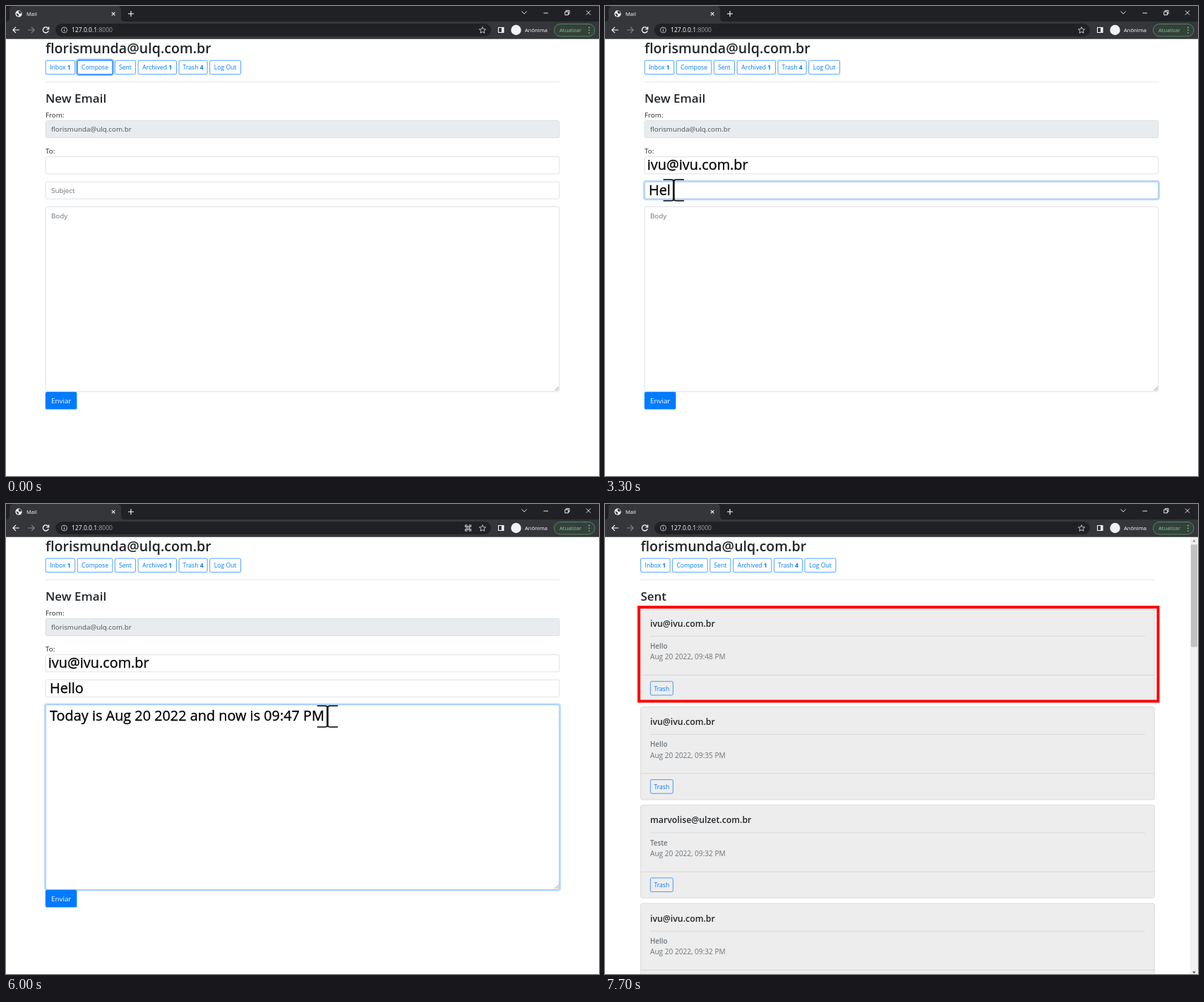
Animation of 840 by 666 pixels, one loop 8000 ms. Source, as an HTML page:

```html
<!DOCTYPE html>
<html lang="pt-BR">
<head>
<meta charset="utf-8">
<title>Mail</title>
<style>
html, body { margin: 0; width: 100%; height: 100%; overflow: hidden; background: #fff; }
svg { display: block; width: 840px; height: 666px; }
text { font-family: "Open Sans", "Noto Sans", sans-serif; white-space: pre; }
.h2 { font-size: 19.6px; font-weight: 600; fill: #212529; }
.h3 { font-size: 17px; font-weight: 600; fill: #212529; }
.h5 { font-size: 12.3px; font-weight: 600; fill: #212529; }
.label { font-size: 9.8px; fill: #212529; }
.value { font-size: 9.8px; fill: #495057; }
.hint { font-size: 9.8px; fill: #6c757d; }
.date { font-size: 10.1px; fill: #6c757d; }
.bold { font-weight: 600; }
.btn { font-size: 8.6px; fill: #007bff; text-anchor: middle; }
.btn tspan { font-weight: 700; }
.bar { font-size: 7.6px; fill: #fff; }
.hand { font-size: 19.85px; fill: #000; stroke: #000; stroke-width: .3px; }
.ico { fill: none; stroke: #fff; stroke-width: 1.1px; }
</style>
</head>
<body>
<svg id="stage" viewBox="0 0 840 666" xmlns="http://www.w3.org/2000/svg"></svg>
<script>
const LOOP = 8000;
const USER = 'florismunda@ulq.com.br';
const FRIEND = 'ivu@ivu.com.br';
const OTHER = 'marvolise@ulzet.com.br';
const BODY = 'Today is Aug 20 2022 and now is 09:47 PM';
const LEFT = 55.8, WIDTH = 728.4, LINE = .7;

const text = (x, y, cls, s, extra = '') => `<text x="${x}" y="${y}" class="${cls}" ${extra}>${s}</text>`;
const rect = (x, y, w, h, fill, extra = '') =>
  `<rect x="${x}" y="${y}" width="${w}" height="${h}" fill="${fill}" ${extra}/>`;
const path = (d, extra = 'class="ico"') => `<path d="${d}" ${extra}/>`;
const circle = (x, y, r, extra) => `<circle cx="${x}" cy="${y}" r="${r}" ${extra}/>`;

// a rounded box whose border lies inside the given size
const frame = (x, y, w, h, fill, stroke, r = 2.4) =>
  rect(x + LINE / 2, y + LINE / 2, w - LINE, h - LINE, fill, `rx="${r}" stroke="${stroke}" stroke-width="${LINE}"`);
const button = (x, y, w, label) =>
  frame(x, y, w, 20.3, 'none', '#007bff', 1.9) + text(x + w / 2, y + 13.6, 'btn', label);
const box = (y, h, fill = '#fff') => frame(LEFT, y, WIDTH, h, fill, '#ced4da');
const ring = (id, x, y, w, h, color, alpha) => `<g id="${id}">` +
  rect(x - 1, y - 1, w + 2, h + 2, 'none', `rx="3.4" stroke="#007bff" stroke-opacity="${alpha}" stroke-width="2"`) +
  frame(x, y, w, h, 'none', color) + '</g>';
const fieldRing = (id, y, h) => ring(id, LEFT, y, WIDTH, h, '#80bdff', .25);

function chrome() {
  const dots = [30.5, 34.3, 38.1].map(y => circle(826, y, .9, 'fill="#81c995"')).join('');
  return rect(0, 0, 840, 46.5, '#202124') +
    path('M0 22Q5 22 5 17V6Q5 0 11 0H157Q163 0 163 6V17Q163 22 168 22H840V46.5H0Z', 'fill="#35363a"') +
    circle(18, 11, 4.7, 'fill="#f1f3f4"') +
    path('M14.2 10.5l3 .6 1 2.2-1.2 2zM18 7l3 .5 1 2.8-2.4.6-1.8-1.5z', 'fill="#35363a"') +
    text(29, 14, 'bar', 'Mail') +
    path('M149.8 8.8l4.6 4.6m0-4.6l-4.6 4.6M173 11h8m-4-4v8') +
    path('M730.5 7.5l3.6 3.6 3.6-3.6M761.5 10h6.5M822 6.5l6 6m0-6l-6 6M791.8 8h4.7v4.7h-4.7zM793.4 8V6.4h4.7v4.7h-1.6', 'class="ico" style="stroke-width:.9px"') +
    path('M19 34H10m4-4.2L9.8 34l4.2 4.2') +
    path('M31 34h9m-4-4.2l4.2 4.2-4.2 4.2', 'class="ico" style="stroke:#85868a"') +
    path('M59.7 31.7A4 4 0 1 0 60.2 35.2M60.6 29.6v3.2h-3.2', 'class="ico" style="stroke-width:1.3px"') +
    rect(70, 25, 617, 18, '#202124', 'rx="9"') +
    circle(82.5, 34, 4, 'fill="none" stroke="#c4c7ca" stroke-width=".9"') +
    path('M82.5 33.3v3M82.5 31.4v1', 'stroke="#c4c7ca"') +
    text(93, 37.2, 'bar', '127.0.0.1<tspan fill="#9aa0a6">:8000</tspan>', 'style="font-size:8.55px"') +
    '<g id="grid">' + path('M652.6 32.4h-2v-2.6h2.4v8.4h-2.4v-2.6h8v2.6h-2.4v-8.4h2.4v2.6h-8', 'class="ico" style="stroke:#d5d7da;stroke-width:1px"') + '</g>' +
    path('M675 29.7l1.3 3 3.3.3-2.5 2.1.8 3.2-2.9-1.7-2.9 1.7.8-3.2-2.5-2.1 3.3-.3z', 'class="ico" style="stroke:#d5d7da;stroke-width:.9px"') +
    rect(697.5, 30.5, 7.5, 7, 'none', 'stroke="#fff"') + rect(702, 30.5, 3, 7, '#fff') +
    circle(722.5, 34, 7.2, 'fill="#f1f3f4"') +
    text(735, 36.8, 'bar', 'Anônima') +
    rect(776.5, 25.5, 57.5, 17.5, '#35403b', 'rx="8.7" stroke="#4f8a63"') +
    text(784, 36.8, 'bar', 'Atualizar', 'style="fill:#81c995"') + dots;
}

function header(title) {
  const y = 76.8;
  return text(56, 67, 'h2', USER) +
    button(LEFT, y, 42.3, 'Inbox <tspan>1</tspan>') + button(100.9, y, 50.3, 'Compose') +
    button(154, y, 29.8, 'Sent') + button(186.8, y, 55, 'Archived <tspan>1</tspan>') +
    button(244.7, y, 40.8, 'Trash <tspan>4</tspan>') + button(288.3, y, 44.6, 'Log Out') +
    rect(LEFT, 107.3, WIDTH, LINE, '#dedede') + text(56, 137, 'h3', title);
}

function compose() {
  return '<g id="compose">' + header('New Email') +
    ring('navRing', 100.9, 76.8, 50.3, 20.3, '#007bff', .5) +
    text(56, 158, 'label', 'From:') + box(162.1, 24.9, '#e9ecef') + text(64, 178.4, 'value', USER) +
    text(56, 209, 'label', 'To:') + box(213.3, 24.9) + box(248.7, 24.9) + box(284.2, 262.5) +
    fieldRing('toRing', 213.3, 24.9) + fieldRing('subjectRing', 248.7, 24.9) + fieldRing('bodyRing', 284.2, 262.5) +
    text(64, 265, 'hint', 'Subject', 'id="subjectHint"') + text(64, 300.5, 'hint', 'Body', 'id="bodyHint"') +
    path('M777.5 545l5.5-5.5m-2.6 5.5l2.6-2.6', 'stroke="#777" stroke-width=".8"') +
    rect(LEFT, 546.7, 44.6, 24.9, '#007bff', 'rx="2.6" id="send"') +
    text(78.2, 563, 'label', 'Enviar', 'text-anchor="middle" style="fill:#fff"') +
    text(59.8, 232.2, 'hand', '', 'id="to"') + text(62, 267.5, 'hand', '', 'id="subject"') +
    text(62, 306.7, 'hand', '', 'id="body"') + '</g>';
}

function card(y, who, subject, time) {
  return `<g transform="translate(0 ${y})">` +
    frame(50.2, 0, WIDTH, 132.3, '#ededed', '#cfcfcf') +
    text(64, 26, 'h5', who) + rect(64, 39.3, 701, LINE, '#d2d2d2') +
    text(64, 57.4, 'hint bold', subject) + text(64, 72.5, 'date', `Aug 20 2022, ${time} PM`) +
    rect(51, 94.5, 727, LINE, '#cbcbcb') + button(64, 103.2, 32.7, 'Trash') + '</g>';
}

function sent() {
  const mails = [[FRIEND, 'Hello', '09:48'], [FRIEND, 'Hello', '09:35'], [OTHER, 'Teste', '09:32'], [FRIEND, 'Hello', '09:32']];
  return '<g id="sent"><g transform="translate(-5.6 0)">' + header('Sent') + '</g>' +
    mails.map((m, i) => card(147.8 + i * 139.25, ...m)).join('') +
    rect(829, 46.5, 11, 619.5, '#f1f1f1') + rect(830, 57.5, 9, 145, '#c1c1c1') +
    path('M832 53.5l2.5-2.7 2.5 2.7z', 'fill="#8a8a8a"') + path('M832 662.5l2.5 2.7 2.5-2.7z', 'fill="#505050"') +
    rect(48, 146.2, 735.5, 133.3, 'none', 'id="mark" stroke="#f00" stroke-width="4"') + '</g>';
}

function pointers() {
  const beam = 'M-14.7-15H-4Q0-15 0-12.5Q0-15 4-15H14.7M-14.7 15H-4Q0 15 0 12.5Q0 15 4 15H14.7';
  return '<g id="beam">' + path(beam, 'fill="none" stroke="#000" stroke-width="1.5"') +
    path('M0-14V14', 'stroke="#000" stroke-width="2.6"') + '</g>' +
    '<g id="arrow">' + path('M0 0V27L6.3 21.2 10.5 31 15 29 10.8 19.5H19.2Z', 'fill="#fff" stroke="#000" stroke-width="1.4"') + '</g>' +
    '<g id="finger">' + path('M-3 0Q0-3 3 0V13L17 17Q21 18 20 24L17 40H-3L-17 23Q-18 17-12 19L-3 26Z', 'fill="#fff" stroke="#000" stroke-width="1.4" stroke-linejoin="round"') + '</g>';
}

document.getElementById('stage').innerHTML = rect(0, 0, 840, 666, '#fff') + compose() + sent() + chrome() + pointers();

const el = id => document.getElementById(id);
const show = (id, on) => el(id).setAttribute('display', on ? 'inline' : 'none');
const clamp = (v, lo, hi) => Math.min(hi, Math.max(lo, v));
const type = (id, s, n) => { el(id).textContent = s.slice(0, clamp(Math.floor(n), 0, s.length)); };
const blink = (t, start) => Math.floor((t - start) / 200) % 2 === 0;

// start time, shape, x, y of each mouse stop
const stops = [
  [500, 'arrow', 218, 98], [600, 'arrow', 345, 250], [700, 'beam', 465, 391],
  [2900, 'beam', 260, 410],
  [4000, 'beam', 110, 285], [4100, 'beam', 135, 318], [4200, 'beam', 144, 328],
  [6600, 'beam', 395, 430], [6700, 'arrow', 235, 585], [6800, 'arrow', 110, 624], [6900, 'finger', 60, 560]
];

// the caret that follows the typed words: start, end, field, y
const carets = [[900, 2900, 'to', 225], [3000, 4000, 'subject', 261], [4300, 6600, 'body', 301]];

function pointer(t) {
  if (t < 500 || t >= 7100) return null;
  const c = carets.find(([a, b]) => t >= a && t < b);
  if (!c) return stops.filter(s => s[0] <= t).pop().slice(1);
  if (t >= 5800 && blink(t, 5800)) return null;
  const field = el(c[2]);
  const w = field.textContent ? field.getComputedTextLength() : 1;
  return ['beam', +field.getAttribute('x') + w + 4.5, c[3]];
}

function draw(time) {
  const t = Math.floor(time / 100) * 100;
  const done = t >= 7100;
  show('compose', !done);
  show('sent', done);
  show('mark', t >= 7300 && blink(t, 7300));
  show('grid', t >= 4000 && !done);
  show('navRing', t < 900);
  show('toRing', t >= 900 && t < 3000);
  show('subjectRing', t >= 3000 && t < 4100);
  show('bodyRing', t >= 4100 && !done);
  show('subjectHint', t < 3000);
  show('bodyHint', t < 4100);
  el('send').setAttribute('fill', t >= 6900 ? '#0069d9' : '#007bff');
  type('to', FRIEND, (t - 1000) / 100);
  type('subject', 'Hello', (t - 3000) / 100);
  type('body', BODY, 14 + (t - 4800) / 100 * 3.25);
  const p = pointer(t);
  for (const id of ['beam', 'arrow', 'finger']) {
    const on = !!p && p[0] === id;
    show(id, on);
    if (on) el(id).setAttribute('transform', `translate(${p[1]} ${p[2]})`);
  }
}

function tick() {
  // the red mark stays lit through the last 300 ms
  draw(Math.min(performance.now() % LOOP, 7899));
  requestAnimationFrame(tick);
}
tick();
</script>
</body>
</html>
```
